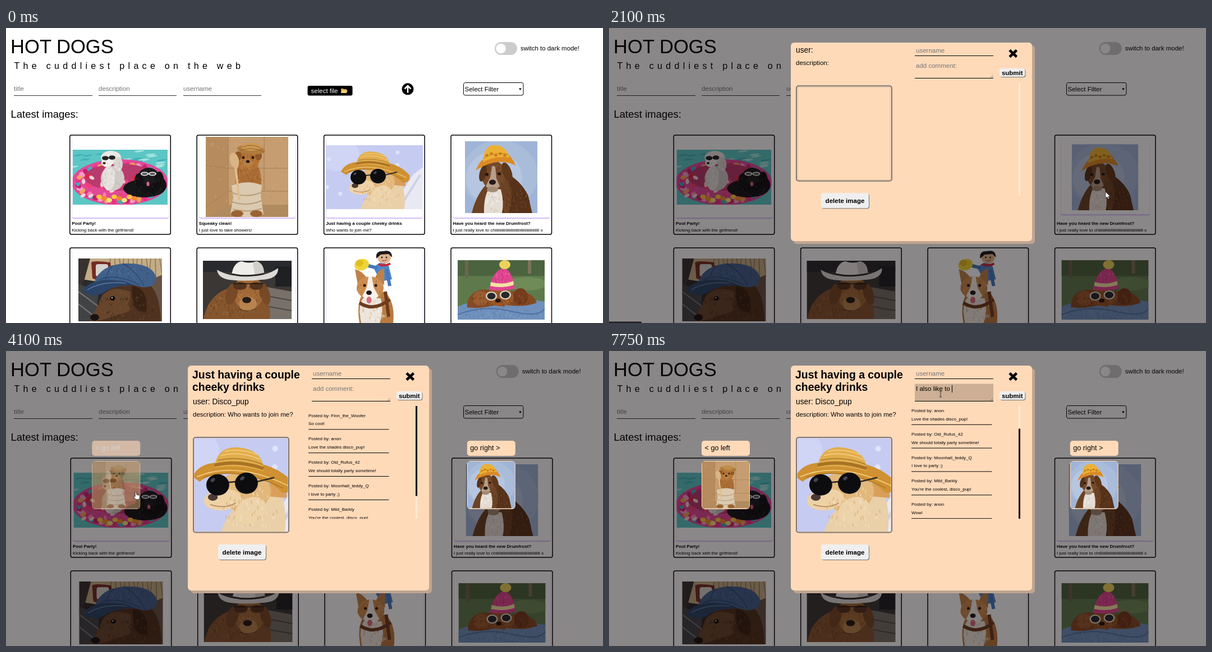
Animation of 1064x526 px, one loop 8000 ms. Source, as an HTML page:

```html
<!DOCTYPE html>
<html lang="en">
<head>
<meta charset="utf-8">
<title>Hot Dogs</title>
<style>
html, body { margin: 0; width: 100%; height: 100%; overflow: hidden; background: #fff }
svg { display: block; width: 100%; height: 100% }
text { font-family: "Liberation Sans", Arial, sans-serif; white-space: pre }
</style>
</head>
<body>
<svg id="stage" viewBox="0 0 1064 526"></svg>
<script>
const $ = id => document.getElementById(id);
const LOOP = 8000, PEACH = '#ffdab9', BASE = 11.52, SMALL = 8.06;

// drawing helpers
const R = (x, y, w, h, f, r = 0, more = '') =>
  `<rect x="${x}" y="${y}" width="${w}" height="${h}" rx="${r}" fill="${f}" ${more}/>`;
const E = (x, y, rx, ry, f, a = 0) =>
  `<ellipse cx="${x}" cy="${y}" rx="${rx}" ry="${ry}" fill="${f}" transform="rotate(${a} ${x} ${y})"/>`;
const P = (d, f) => `<path d="${d}" fill="${f}"/>`;
const L = (d, c = '#000', w = 1, more = '') =>
  `<path d="${d}" fill="none" stroke="${c}" stroke-width="${w}" ${more}/>`;
const T = (x, y, s, size = BASE, f = '#000', more = '') =>
  `<text x="${x}" y="${y}" font-size="${size}" fill="${f}" ${more}>${s.replace(/</g, '&lt;')}</text>`;
const G = (id, body, more = '') => `<g id="${id}" ${more}>${body}</g>`;
const BOLD = 'font-weight="bold"';
const use = (id, x, y, w, h) => `<use href="#${id}" x="${x}" y="${y}" width="${w}" height="${h}"/>`;
const times = (n, f) => Array.from({ length: n }, (_, i) => f(i)).join('');

let seed = 7;
const rnd = (a, b) => a + (b - a) * ((seed = seed * 16807 % 2147483647) / 2147483647);

// short soft hairs strewn over an ellipse
const fur = (x, y, rx, ry, colours, n = 40) => times(n, i => {
  const a = rnd(0, 6.28), r = Math.sqrt(rnd(0, 1));
  const hx = x + rx * r * Math.cos(a), hy = y + ry * r * Math.sin(a);
  return L(`M${hx.toFixed(1)} ${hy.toFixed(1)}l${rnd(-2, 2).toFixed(1)} 4`,
    colours[i % colours.length], 1.3, 'opacity=".55"');
});

const photos = {
  pool: [119, 217, 169, 98,
    R(119, 217, 169, 98, '#5cc6c5') +
    times(24, i => E(rnd(120, 288), rnd(218, 250), 9, 1.6, ['#a5e4e0', '#3fb2ba'][i % 2], -8)) +
    E(203, 275, 86, 41, '#e04a97') +
    times(40, i => E(203 + 75 * Math.cos(i / 6.37), 276 + 33 * Math.sin(i / 6.37), 6, 4,
      ['#3ab0c0', '#ec2f86', '#f0a35a', '#f59cc4', '#c9206e'][i % 5], i * 40)) +
    E(203, 266, 63, 24, '#b93a6c') +
    times(36, i => E(rnd(137, 240), rnd(264, 302), 5, 3, ['#e8253c', '#ff7fae', '#ef3f78', '#f6d4d6'][i % 4], i * 30)) +
    E(246, 286, 37, 16, '#161619') + E(262, 280, 24, 19, '#121215') + E(254, 264, 18, 15, '#1b1b1e') +
    E(237, 272, 8, 13, '#121214') + E(273, 270, 8, 14, '#121214') +
    fur(252, 280, 28, 18, ['#3a3a40', '#050507']) +
    E(247, 260, 7, 3.4, '#eee') + E(261, 260, 7, 3.4, '#eee') +
    E(247, 260, 5, 2.1, '#555') + E(261, 260, 5, 2.1, '#555') + E(253, 278, 2.6, 4, '#d8657c') +
    E(190, 268, 21, 22, '#cfcac6') + E(183, 268, 11, 22, '#e4dfdb') + E(187, 231, 18, 12, '#ebe7e4') +
    E(200, 243, 8, 13, '#d9d4d0') + E(180, 240, 10, 8, '#f2eeeb') +
    fur(189, 258, 17, 32, ['#fff', '#b5aeaa']) + E(177, 232, 6, 3.8, '#222') +
    E(189, 231, 6, 3.8, '#222') + E(175, 241, 2.6, 2, '#222') +
    times(8, i => E(166 + i * 9, 301 + i % 3 * 3, 5, 4, ['#f7c93b', '#f28b2c', '#f5e27a'][i % 3]))],
  bath: [356, 194, 147, 143,
    R(356, 194, 147, 143, '#c59d70') + R(356, 194, 40, 143, '#b68c5f') +
    fur(430, 262, 100, 95, ['#d3b083', '#b48a5c'], 110) +
    L('M396 194V337M460 194V290M356 245L396 250H503M356 320L396 291H503', '#a67c52', 1) +
    P('M356 337L400 315H503V337Z', '#b08b5f') +
    E(432, 272, 23, 38, '#a96c34') + fur(432, 260, 22, 34, ['#8a5425', '#c98d50'], 60) +
    P('M402 281Q430 270 456 280L454 300 459 332Q430 342 400 331L405 302Z', '#dccab0') +
    L('M404 294Q430 304 455 293M403 310Q430 319 455 308M404 323Q430 330 456 322', '#b79f7e', 2) +
    E(431, 235, 21, 19, '#b37336') + fur(431, 236, 20, 18, ['#8a5222', '#d09455']) +
    E(414, 228, 6, 8, '#8f5826') + E(450, 228, 6, 8, '#8f5826') +
    E(437, 217, 25, 8, '#b07c3d', 6) + E(437, 212, 17, 7, '#cb9853') +
    L('M416 219Q437 210 460 221M422 212Q437 206 452 213', '#8f6129', 1) +
    E(431, 241, 9, 7, '#b87f45') + E(431, 238, 3.4, 2.5, '#21160f') + E(423, 231, 2.4, 2.4, '#21160f') +
    E(440, 231, 2.4, 2.4, '#21160f') + E(407, 236, 8, 14, '#d9b586', -12) + L('M409 248L416 307', '#e0bd8c', 4) +
    E(412, 331, 11, 6, '#9a6231') + E(446, 331, 11, 6, '#9a6231')],
  shades: [570, 209, 173, 114,
    R(570, 209, 173, 114, '#c6cbf1') + E(590, 225, 40, 30, '#d0d4f5') +
    times(18, () => E(rnd(572, 742), rnd(212, 310), 3.5, 3.5, '#dfe4fb')) +
    P('M686 323L725 262 743 248V323Z', '#e9e9f4') + L('M700 323L738 262', '#cfd0e2', 4) +
    P('M632 323Q642 292 676 268L704 270Q713 296 710 323Z', '#e9d0a8') +
    P('M690 264Q714 268 712 282L690 280Z', '#d99f5a') +
    E(659, 274, 34, 24, '#e2b87b') + E(634, 284, 23, 13, '#eed2a6', -6) + E(668, 297, 20, 15, '#edd3aa', -30) +
    fur(668, 294, 32, 27, ['#f8e8cb', '#cfa266'], 60) +
    E(622, 281, 6, 4.3, '#4c3a36') + L('M619 290Q637 296 650 288', '#a97f58', 1) +
    P('M597 256Q606 238 631 239Q690 231 719 262Q722 276 707 276Q690 257 656 253Q620 250 606 262Z', '#cf9131') +
    P('M624 245Q626 222 648 220Q684 221 684 249Q650 240 624 245Z', '#e2ad4c') +
    L('M624 242Q652 235 684 246', '#a97325', 4) +
    L('M603 256Q650 236 714 267M632 230Q655 224 680 235M637 225Q656 221 676 229', '#f2cc7c', 1.2) +
    L('M610 257Q650 242 708 270M628 236Q655 230 683 241', '#a8752a', 1) +
    L('M640 263L651 262M676 262L697 257', '#332b25', 1.8) +
    E(628, 266, 14, 13, '#0d0d10') + E(663, 264, 14, 13, '#0d0d10') +
    E(622, 260, 3, 2, '#454552', -40) + E(658, 258, 3, 2, '#454552', -40)],
  bucket: [818, 202, 129, 128,
    R(818, 202, 129, 128, '#9fb4d6') + E(880, 262, 68, 62, '#a9bcda') + E(870, 268, 50, 48, '#b6c6e0') +
    P('M830 330Q838 298 855 280L890 258Q916 270 930 298L938 330Z', '#6b4224') +
    P('M892 262Q918 272 931 300L937 330H896Q906 298 892 262Z', '#57321a') +
    fur(890, 305, 42, 24, ['#8c5a33', '#3d210f'], 90) +
    P('M852 330Q851 300 862 284L882 288Q888 310 884 330Z', '#e6ded5') +
    fur(868, 308, 13, 18, ['#fff', '#c3b5a6'], 30) +
    E(869, 262, 22, 25, '#74492a') + fur(869, 262, 21, 23, ['#8f6038', '#50301a']) +
    E(850, 259, 6, 15, '#55321a', 14) + E(893, 257, 8, 18, '#5f381c', -20) +
    P('M866 247Q870 244 872 248L874 268 880 282Q867 296 855 282L863 266Z', '#b79f88') +
    E(867, 288, 10, 5, '#a38a74') + E(867, 275, 6, 4.6, '#241a17') +
    E(857, 261, 3, 2.5, '#1c120c') + E(879, 260, 3, 2.5, '#1c120c') +
    P('M837 254Q846 234 854 232L896 226Q906 236 908 245Q876 229 837 254Z', '#dc8a24') +
    P('M850 239Q851 213 866 209Q890 206 897 231Q873 227 850 239Z', '#ecb134') +
    L('M851 232Q872 220 896 225', '#cc8a22', 1.2) +
    times(5, i => E(857 + i * 8, 227 - i % 2 * 3, 2.8, 2.3, '#c87a1c'))],
  cap: [129, 411, 149, 112,
    R(129, 411, 149, 112, '#2c2a2a') + P('M129 411H278V470L129 447Z', '#c3ac86') +
    times(12, i => L(`M${186 + i * 8} 411l${i % 3 * 4 - 3} 34`, '#8d7a58', 1.6)) +
    P('M129 411H150L140 448 129 475Z', '#38322f') + P('M129 456L165 470 160 523H129Z', '#414244') +
    L('M129 470L164 496M129 492L160 516', '#77797b', 2) +
    P('M152 418Q156 414 186 418L190 447Q166 454 154 446Z', '#742c23') + R(160, 421, 22, 22, '#d3d2cd', 4) +
    P('M238 458L278 440V523H238Z', '#665345') +
    P('M152 523Q166 478 190 462L252 455Q274 468 276 523Z', '#4f321f') +
    P('M172 476Q190 458 222 470L220 505Q190 515 162 523H150Z', '#66452b') +
    P('M224 460Q254 462 250 505Q236 510 226 492Z', '#372213') +
    fur(214, 496, 52, 28, ['#7d5636', '#33200f'], 90) +
    E(190, 482, 4.5, 4, '#110b08') + E(189, 481, 1.2, 1.2, '#ddd') + E(158, 516, 8, 6, '#1a1310') +
    P('M158 452Q168 424 208 420Q262 418 268 446Q266 464 242 462Q200 450 158 466Z', '#40608a') +
    P('M137 470Q144 452 176 449Q210 448 230 459Q190 458 172 473Q154 481 137 470Z', '#2b4468') +
    fur(214, 440, 42, 15, ['#5f80a8', '#2c4a70'], 50) +
    L('M166 449Q196 436 238 458M208 420Q232 432 246 460M190 424Q180 434 178 448', '#2b4a70', 1.6) +
    L('M145 467Q170 451 214 455', '#6685aa', 1.2)],
  cowboy: [351, 415, 158, 104,
    R(351, 415, 158, 104, '#3b3735') + R(351, 415, 158, 20, '#292a2d') +
    P('M466 462L509 470V519H460Z', '#77716a') + L('M466 478L509 486M464 496L509 504', '#4e4843', 2) +
    R(480, 425, 29, 36, '#1f2023') +
    P('M352 519Q360 474 402 462L458 474Q474 494 470 519Z', '#85552e') +
    fur(400, 497, 46, 22, ['#ab7745', '#5c371b'], 80) +
    E(432, 472, 28, 29, '#a16937') + E(402, 474, 10, 20, '#774926', 16) + E(461, 474, 9, 20, '#774926', -16) +
    fur(432, 476, 27, 25, ['#bd8650', '#754624'], 60) +
    E(431, 492, 16, 13, '#b8834e') + E(429, 485, 8, 5.5, '#241a17') + L('M415 501Q430 508 445 500', '#5f3d22', 1.4) +
    E(417, 460, 12, 7, '#54341f') + E(446, 460, 12, 7, '#54341f') + L('M404 456H459', '#20140e', 1.5) +
    P('M376 431Q398 444 430 443Q464 443 485 428Q486 448 454 449Q426 452 398 449Q378 446 376 431Z', '#dcdad6') +
    P('M402 441Q405 418 420 416Q433 421 446 416Q460 419 460 440Q430 447 402 441Z', '#efede9') +
    P('M440 419L446 416Q460 419 460 440L444 442Z', '#d2cfca') + L('M402 439Q430 445 460 438', '#2b2828', 3)],
  rider: [618, 396, 76, 134,
    P('M655 428Q667 412 682 424L688 448 668 452Z', '#4e86c8') + L('M662 428L642 423M678 430L684 460', '#4579bb', 6) +
    E(634, 422, 13, 10, '#f0d536', -15) + E(630, 419, 7, 6, '#e0bd22') +
    E(674, 409, 12, 11, '#dfb48e') + P('M660 411Q658 397 672 398Q688 394 688 409L682 403 668 404Z', '#1d1a1c') +
    E(670, 409, 1.4, 1.6, '#222') + E(678, 409, 1.4, 1.6, '#222') + L('M670 414Q674 417 679 413', '#933', 1) +
    L('M664 421Q674 426 685 420', '#cc2736', 4) +
    P('M630 526Q624 490 636 474L675 470Q694 488 690 526Z', '#b97b40') +
    P('M633 526Q626 492 638 480L668 482Q674 508 666 526Z', '#ece5db') +
    fur(656, 504, 27, 20, ['#fff', '#c99a68', '#d8c7b3'], 50) +
    L('M630 490Q655 507 684 484M676 470L682 515', '#6d3c20', 6) +
    P('M627 458L622 430Q636 434 644 447Z', '#c08149') + P('M657 448Q662 432 674 428L674 458Z', '#c08149') +
    E(649, 463, 24, 20, '#cc8d51') + fur(649, 463, 23, 18, ['#e3b27c', '#a9692f']) +
    P('M646 443L652 443 655 462 664 478Q650 492 635 478L643 462Z', '#f6f1ea') +
    E(647, 472, 5, 4, '#1e1818') + E(639, 459, 2.5, 2.5, '#221611') + E(659, 459, 2.5, 2.5, '#221611') +
    E(647, 485, 4.5, 6, '#d76d7a')],
  bobble: [805, 414, 155, 106,
    R(805, 414, 155, 106, '#5e7a4c') + R(805, 414, 155, 28, '#4b633e') + E(928, 456, 36, 12, '#6f8b58') +
    R(818, 414, 6, 32, '#6d6450') + R(930, 414, 6, 24, '#7d735d') +
    P('M805 497Q840 480 880 494Q920 480 960 488V520H805Z', '#6f90bc') +
    fur(882, 508, 76, 9, ['#8ea9cd', '#5475a3'], 70) +
    L('M805 511Q850 493 900 505T960 500', '#4f70a0', 2) +
    P('M822 498Q820 472 850 466L898 470Q938 466 946 490Q920 500 880 492Q846 502 822 498Z', '#854a24') +
    E(846, 482, 14, 13, '#9a5c32') + E(917, 479, 13, 15, '#763c1d') +
    fur(884, 483, 56, 14, ['#b5733f', '#5f2f15'], 80) + E(880, 480, 25, 16, '#985629') +
    fur(880, 484, 22, 11, ['#bd7e4a', '#713b1b'], 30) + E(877, 486, 5, 3.6, '#22150f') +
    E(865, 478, 10, 8, '#e0d9c6') + E(890, 476, 10, 8, '#e0d9c6') + E(865, 478, 7.6, 6, '#26292b') +
    E(890, 476, 7.6, 6, '#26292b') +
    P('M861 467Q868 430 888 428Q903 434 907 465Q884 470 861 467Z', '#df4590') +
    fur(885, 445, 14, 15, ['#f07cb4', '#bb2b73'], 30) +
    P('M864 453Q886 459 904 451L905 458Q886 465 863 460Z', '#f3e3a4') + E(889, 422, 10, 8, '#ecd25c')]
};

const zeal = 'ch' + 'i'.repeat(42) + 'll x';
const captions = [
  ['Pool Party!', 'Kicking back with the girlfriend!'],
  ['Squeaky clean!', 'I just love to take showers!'],
  ['Just having a couple cheeky drinks', 'Who wants to join me?'],
  ['Have you heard the new Drumfrost?', 'I just really love to ' + zeal]
];

function card(id, i) {
  const x = 113.8 + i % 4 * 226.4, y = i < 4 ? 191 : 392;
  const [px, py, w, h] = photos[id], [title, about] = captions[i] || ['', ''];
  return R(x, y, 179.5, 177, '#fff', 3, 'stroke="#000" stroke-width="1.5"') +
    G('pic' + i, R(x + 3.5, y + 5, 173, 144.5, '#e9dcff', 4) + R(x + 4, y + 6, 172, 142.7, '#d6bdfb', 4) +
      R(x + 4, y + 4, 172, 143, '#fff', 3) + use(id, px, py, w, h)) +
    T(x + 3.6, 351, title, SMALL, '#000', BOLD) + T(x + 3.6, 362.5, about, SMALL);
}

const hint = (x, y, s) => T(x, y, s, BASE, '#757575');

const header =
  T(8.1, 45, 'HOT DOGS', 34.56) +
  T(14.5, 73, 'The cuddliest place on the web', 16.1, '#000', 'letter-spacing="6.26"') +
  hint(14, 112, 'title') + hint(165, 112, 'description') + hint(316, 112, 'username') +
  L('M14 120.5H154M165 120.5H304M316 120.5H455', '#333') +
  R(537.5, 103, 80, 17.5, '#000', 3) + T(543.5, 116, 'select file', BASE, '#fff') +
  P('M597 108H601L602 109H607V116H597Z', '#d9a440') + P('M599 111H608.5L607 116H597Z', '#f6cf74') +
  E(716, 108.8, 10.5, 10.5, '#000') + L('M716 115.5V103.5M710.5 108.5L716 103 721.5 108.5', '#fff', 2.6) +
  R(815.5, 97.5, 106.5, 22.5, '#fff', 3, 'stroke="#000"') + T(817.5, 113, 'Select Filter') +
  P('M914 107.5H919L916.5 111Z', '#000') + T(8.5, 160, 'Latest images:', 18.55) +
  G('mode', R(871, 25, 40, 23, '#ccc', 11.5) + E(882, 36.5, 8.8, 8.8, '#fff') +
    T(917, 40, 'switch to dark mode!', 11.45));

// dialog contents: loading, first post, second post
const posts = [null, {
  title: ['Have you heard the', 'new Drumfrost?'], user: 'Amber_oat_fan_37',
  about: ['I just really love to', zeal], pic: 'bucket', prev: 'shades', next: 'cap', bar: 0,
  notes: [['disco_pup', 'Love the hat!'], ['Amber_oat_fan_37', 'Thanks, @disco_pup!']]
}, {
  title: ['Just having a couple', 'cheeky drinks'], user: 'Disco_pup',
  about: ['Who wants to join me?'], pic: 'shades', prev: 'bath', next: 'bucket', bar: 160.5,
  notes: [['Finn_the_Woofer', 'So cool!'], ['anon', 'Love the shades disco_pup!'],
    ['Old_Rufus_42', 'We should totally party sometime!'], ['Moonhall_teddy_Q', 'I love to party ;)'],
    ['Mild_Barkly', "You're the coolest, disco_pup!"], ['anon', 'Wow!']]
}];

const button = (x, y, w, h, s, ty) => R(x + 1, y + 1, w, h, '#77706b', 4) + R(x, y, w, h, '#efefef', 4) +
  T(x + w / 2, ty, s, BASE, '#000', BOLD + ' text-anchor="middle"');

const jump = (x, s, pic) => R(x, 160, 86, 27, PEACH, 5) + T(x + 5.5, 177, s, 12.65, 'currentColor') +
  R(x, 196, 86, 86, PEACH, 6) + `<g clip-path="inset(0 round 5px)">${use(pic, x + 1, 197, 84, 83.5)}</g>`;

function dialog(p) {
  const h = p ? 401 : 354;
  const frame = R(334, 154, 170, 169.5, 'none', 4, 'stroke="#7f7670" stroke-width="2"');
  return R(329, 31, 430, h, '#c0a590', 6) + R(324, 26, 430, h, PEACH, 6) +
    (p ? p.title.map((s, i) => T(332, 49 + i * 22.3, s, 19.4, '#000', BOLD)).join('') : '') +
    G('post', T(333, 94.5, 'user: ' + (p ? p.user : ''), 13.8) +
      T(333, 117, 'description: ' + (p ? p.about[0] : '')) + T(333, 130, p && p.about[1] || '') +
      (p ? use(p.pic, 335.5, 155.5, 167, 166.5) : R(336.5, 156.5, 165, 164.5, 'none', 0, 'stroke="#dcc3aa"')) +
      frame + button(378, 345, 85, 27, 'delete image', 362.5), p ? '' : 'transform="translate(0 -50.7)"') +
    hint(547, 44, 'username') + L('M545 49.5H685') +
    R(545, 58.5, 140, 31, '#000', 0, 'id="field"') + L('M545 89.5H685') +
    L('M680 88.5L684.5 84M683 88.5L684.5 87', '#6b625a', .8) + G('entry', '') +
    L('M714 39.5L726.5 51.5M726.5 39.5L714 51.5', '#000', 4.6) +
    button(696, 72, 45.5, 15, 'submit', 83.7) +
    R(730, 98, 3, 201, '#ffeccf') + R(730, 98, 3, p ? p.bar : 0, '#000', 0, 'id="bar"') +
    `<g clip-path="url(#list)">${G('notes', p ? p.notes.map(([who, s], i) =>
      T(539, 117.5 + i * 41.85, 'Posted by: ' + who, SMALL) + T(539, 132.3 + i * 41.85, s, SMALL) +
      L(`M539 ${139.8 + i * 41.85}H682.5`)).join('') : '')}</g>` +
    (p ? G('prev', jump(165, '< go left', p.prev)) + G('next', jump(821.8, 'go right >', p.next)) : '');
}

$('stage').innerHTML = '<defs>' + Object.entries(photos).map(([id, [x, y, w, h, art]]) =>
  `<symbol id="${id}" viewBox="${x} ${y} ${w} ${h}" preserveAspectRatio="xMidYMid slice">${art}</symbol>`).join('') +
  '<clipPath id="list">' + R(535, 98, 195, 201.3, '#000') + '</clipPath></defs>' +
  header + G('cards', Object.keys(photos).map(card).join('')) +
  R(0, 523.5, 58, 4, '#33363b', 1, 'id="status"') +
  R(0, 0, 1064, 526, '#0c0608', 0, 'id="dim" opacity=".48"') + G('dialog', '') + G('mouse', '');

const pointers = {
  arrow: '<path d="M0 0V11.5L2.7 9 4.6 13 6.5 12.2 4.7 8.4H8.2Z" fill="#fff" stroke="#222" stroke-width=".7"/>',
  hand: '<path d="M-1.4 1Q0-1 1.3 1V5L6 6.2Q7.5 7 7 10L6 14H-.5L-4 9Q-4 7-1.4 8.5Z" fill="#fff" stroke="#111" stroke-width=".9"/>',
  beam: L('M-2-5H2M-2 5H2M0-5V5', '#3b352f', 1)
};

const path = [[650, 1021, 530], [1600, 885, 292], [2150, 885, 292], [3080, 230, 251],
  [4080, 230, 251], [4700, 673, 226], [5320, 673, 226], [5700, 591, 77]];
const message = 'I also like to ';
const strokes = [6400, 6500, 6600, 6750, 6850, 6900, 7000, 7150, 7250, 7400, 7450, 7500, 7600, 7700, 7750];

const pen = document.createElement('canvas').getContext('2d');
pen.font = BASE + 'px "Liberation Sans", Arial, sans-serif';

const ramp = (t, a, b) => {
  const u = Math.min(1, Math.max(0, (t - a) / (b - a)));
  return u * u * (3 - 2 * u);
};
const move = (id, x, y = 0) => $(id).setAttribute('transform', `translate(${x} ${y})`);
const show = (id, on) => $(id).setAttribute('visibility', on ? 'visible' : 'hidden');

function pointerAt(t) {
  let [, x, y] = path[0];
  for (let i = 1; i < path.length; i++) {
    const [a, x0, y0] = path[i - 1], [b, x1, y1] = path[i], u = ramp(t, a, b);
    if (t >= a) [x, y] = [x0 + (x1 - x0) * u, y0 + (y1 - y0) * u];
  }
  return [x, y];
}

let stateShown, kindShown;

function draw(t) {
  const open = t >= 2100, state = !open ? -1 : t < 2200 ? 0 : t < 3500 ? 1 : 2;
  if (state !== stateShown) {
    $('dialog').innerHTML = open ? dialog(posts[state]) : '';
    stateShown = state;
  }
  show('dim', open);
  show('status', t >= 1900 && t < 2350);
  move('cards', open ? 1.5 : 0);
  move('mode', open ? 2.7 : 0);

  const k = 1 - .08 * (ramp(t, 1380, 1900) - ramp(t, 2150, 2650));
  $('pic3').setAttribute('transform', `translate(883 266.5) scale(${k}) translate(-883 -266.5)`);

  const [x, y] = pointerAt(t);
  const kind = open && x < 251 ? 'hand' : open && x > 545 && x < 685 && y < 90 ? 'beam' : 'arrow';
  if (kind !== kindShown) $('mouse').innerHTML = pointers[kindShown = kind];
  move('mouse', x, y);

  if (state > 0) {
    const hover = ramp(t, 2950, 3200) - ramp(t, 4130, 4400);
    move('prev', -11.7 * hover);
    $('prev').setAttribute('opacity', 1 - .38 * hover);
    $('prev').style.color = `rgb(${255 * hover},${255 * hover},${255 * hover})`;
  }
  if (open) {
    const scroll = ramp(t, 4800, 5000);
    move('notes', 0, -50.4 * scroll);
    move('bar', 0, 40.5 * scroll);
    $('field').setAttribute('opacity', .2 * ramp(t, 5560, 5860));
    const typed = message.slice(0, strokes.filter(s => t >= s).length);
    const cx = 547.5 + pen.measureText(typed).width;
    const caret = t >= 5750 && t < 6250 || t >= strokes[0];
    $('entry').innerHTML = (typed ? T(547, 71, typed) : hint(547, 71, 'add comment:')) +
      (caret ? L(`M${cx} 61V74`) : '');
  }
}

const start = performance.now();
function tick(now) {
  draw(Math.max(0, now - start) % LOOP);
  requestAnimationFrame(tick);
}
draw(0);
requestAnimationFrame(tick);
</script>
</body>
</html>
```
